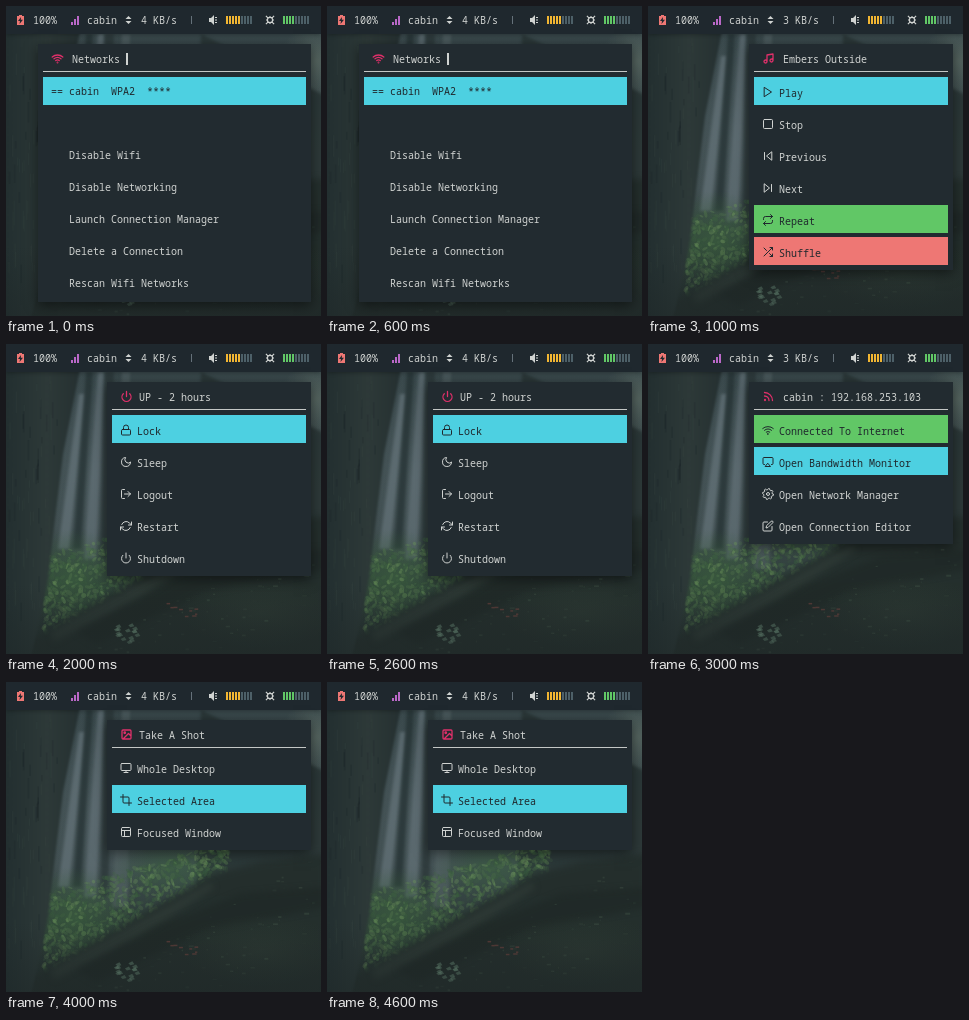
Animation of 315x310 px, one loop 5000 ms. Source, as an HTML page with a canvas:

```html
<!DOCTYPE html>
<html lang="en">
<head>
<meta charset="utf-8">
<title>Desktop menus</title>
<style>
html, body { margin: 0; width: 315px; height: 310px; overflow: hidden; background: #20292c; }
canvas { display: block; }
</style>
</head>
<body>
<canvas id="stage" width="315" height="310"></canvas>
<script>
const W = 315, H = 310;
const stage = document.getElementById('stage');
const ctx = stage.getContext('2d');
const FONT = '10px "Noto Sans Mono", "DejaVu Sans Mono", monospace';
const C = {
  bar: '#1f282e', panel: '#222b30', text: '#d0d3d1', dark: '#1f282d', pink: '#e0306a',
  cyan: '#4dd0e1', green: '#61c766', red: '#ee7774', amber: '#f2b632',
  purple: '#ba68c8', dim: '#4d6068'
};
const SSID = 'cabin';

// Line icons on a 24 unit grid
const box = 'M5 3h14a2 2 0 0 1 2 2v14a2 2 0 0 1-2 2H5a2 2 0 0 1-2-2V5a2 2 0 0 1 2-2z';
const ring = (x, y, r) => `M${x - r} ${y}a${r} ${r} 0 1 0 ${2 * r} 0a${r} ${r} 0 1 0 ${-2 * r} 0z`;

function gear() {
  let d = ring(12, 12, 3);
  for (let i = 0; i < 32; i++) {
    const a = (i + 0.5) * Math.PI / 16, r = i % 4 < 2 ? 11 : 8.5;
    d += (i ? 'L' : 'M') + (12 + r * Math.cos(a)).toFixed(2) + ' ' + (12 + r * Math.sin(a)).toFixed(2);
  }
  return d + 'z';
}

const icons = {
  music: 'M9 18V5l12-2v13' + ring(6, 18, 3) + ring(18, 16, 3),
  play: 'M5 3l14 9-14 9z',
  stop: box,
  prev: 'M19 20L9 12l10-8zM5 19V5',
  next: 'M5 4l10 8-10 8zM19 5v14',
  repeat: 'M17 1l4 4-4 4M3 11V9a4 4 0 0 1 4-4h14M7 23l-4-4 4-4M21 13v2a4 4 0 0 1-4 4H3',
  shuffle: 'M16 3h5v5M4 20L21 3M21 16v5h-5M15 15l6 6M4 4l5 5',
  power: 'M18.4 6.6a9 9 0 1 1-12.8 0M12 2v10',
  lock: 'M5 11h14a2 2 0 0 1 2 2v7a2 2 0 0 1-2 2H5a2 2 0 0 1-2-2v-7a2 2 0 0 1 2-2zM7 11V7a5 5 0 0 1 10 0v4',
  moon: 'M21 12.8A9 9 0 1 1 11.2 3 7 7 0 0 0 21 12.8z',
  logout: 'M9 21H5a2 2 0 0 1-2-2V5a2 2 0 0 1 2-2h4M16 17l5-5-5-5M21 12H9',
  restart: 'M23 4v6h-6M1 20v-6h6M3.5 9a9 9 0 0 1 14.9-3.4L23 10M1 14l4.6 4.4A9 9 0 0 0 20.5 15',
  feed: 'M4 11a9 9 0 0 1 9 9M4 4a16 16 0 0 1 16 16' + ring(5, 19, 1),
  wifi: 'M5 12.6a11 11 0 0 1 14 0M1.4 9a16 16 0 0 1 21.2 0M8.5 16.1a6 6 0 0 1 7 0' + ring(12, 20, 0.6),
  cast: 'M5 17H4a2 2 0 0 1-2-2V5a2 2 0 0 1 2-2h16a2 2 0 0 1 2 2v10a2 2 0 0 1-2 2h-1M12 15l5 6H7z',
  gear: gear(),
  edit: 'M11 4H4a2 2 0 0 0-2 2v14a2 2 0 0 0 2 2h14a2 2 0 0 0 2-2v-7M18.5 2.5a2.1 2.1 0 0 1 3 3L12 15l-4 1 1-4z',
  image: box + ring(8.5, 8.5, 1.5) + 'M21 15l-5-5L5 21',
  screen: 'M4 3h16a2 2 0 0 1 2 2v10a2 2 0 0 1-2 2H4a2 2 0 0 1-2-2V5a2 2 0 0 1 2-2zM8 21h8M12 17v4',
  crop: 'M6 1v15a2 2 0 0 0 2 2h15M1 6h15a2 2 0 0 1 2 2v15',
  layout: box + 'M3 9h18M9 21V9'
};

// Each row: icon, label, optional fill
const menus = [
  { x: 32, title: 'Networks', icon: 'wifi', tx: 66, rate: 4, cursor: true, rows: [
    [null, `== ${SSID}  WPA2  ****`, C.cyan], [null, ''],
    ...['Disable Wifi', 'Disable Networking', 'Launch Connection Manager',
      'Delete a Connection', 'Rescan Wifi Networks'].map(s => [null, '   ' + s])] },
  { x: 101, title: 'Embers Outside', icon: 'music', tx: 135, rate: 3, rows: [
    ['play', 'Play', C.cyan], ['stop', 'Stop'], ['prev', 'Previous'], ['next', 'Next'],
    ['repeat', 'Repeat', C.green], ['shuffle', 'Shuffle', C.red]] },
  { x: 101, title: 'UP - 2 hours', icon: 'power', tx: 133, rate: 4, rows: [
    ['lock', 'Lock', C.cyan], ['moon', 'Sleep'], ['logout', 'Logout'],
    ['restart', 'Restart'], ['power', 'Shutdown']] },
  { x: 101, title: SSID + ' : 192.168.253.103', icon: 'feed', tx: 135, rate: 3, rows: [
    ['wifi', 'Connected To Internet', C.green], ['cast', 'Open Bandwidth Monitor', C.cyan],
    ['gear', 'Open Network Manager'], ['edit', 'Open Connection Editor']] },
  { x: 101, title: 'Take A Shot', icon: 'image', tx: 133, rate: 4, rows: [
    ['screen', 'Whole Desktop'], ['crop', 'Selected Area', C.cyan], ['layout', 'Focused Window']] }
];

function rect(g, x, y, w, h, fill) {
  g.fillStyle = fill;
  g.fillRect(x, y, w, h);
}

function poly(g, fill, ...p) {
  g.fillStyle = fill;
  g.beginPath();
  for (let i = 0; i < p.length; i += 2) g.lineTo(p[i], p[i + 1]);
  g.fill();
}

function text(s, x, y, color = C.text) {
  ctx.font = FONT;
  ctx.fillStyle = color;
  ctx.fillText(s, x, y);
}

function icon(name, cx, cy, color, weight = 2) {
  ctx.save();
  ctx.translate(cx - 6, cy - 6);
  ctx.scale(0.5, 0.5);
  ctx.lineWidth = weight;
  ctx.lineCap = ctx.lineJoin = 'round';
  ctx.strokeStyle = color;
  ctx.stroke(new Path2D(icons[name]));
  ctx.restore();
}

// Soft elliptical patch of colour
function glow(g, x, y, rx, ry, rgb, alpha) {
  g.save();
  g.translate(x, y);
  g.scale(rx, ry);
  const f = g.createRadialGradient(0, 0, 0, 0, 0, 1);
  f.addColorStop(0, `rgba(${rgb},${alpha})`);
  f.addColorStop(1, `rgba(${rgb},0)`);
  g.fillStyle = f;
  g.fillRect(-1, -1, 2, 2);
  g.restore();
}

function makeForest() {
  const c = document.createElement('canvas');
  c.width = W; c.height = H;
  const g = c.getContext('2d');
  let seed = 11;
  const rnd = () => (seed = seed * 16807 % 2147483647) / 2147483647;

  const sky = g.createLinearGradient(0, 28, 0, H);
  sky.addColorStop(0, '#38474a');
  sky.addColorStop(0.55, '#3f4d4f');
  sky.addColorStop(0.75, '#2d3d38');
  sky.addColorStop(1, '#252f2f');
  rect(g, 0, 0, W, H, sky);
  glow(g, 90, 130, 60, 110, '88,103,108', 0.5);
  glow(g, 310, 55, 35, 40, '104,120,110', 0.6);
  glow(g, 310, 150, 40, 80, '78,92,84', 0.4);

  // Leaning pale and dark trunks in the mist
  g.filter = 'blur(1.5px)';
  poly(g, 'rgba(108,123,129,.6)', 73, 50, 79, 50, 63, 205, 52, 205);
  poly(g, 'rgba(35,47,49,.7)', 80, 28, 87, 28, 75, 205, 67, 205);
  poly(g, 'rgba(108,123,129,.55)', 92, 28, 98, 28, 90, 215, 78, 215);
  poly(g, 'rgba(40,52,54,.7)', 99, 28, 108, 28, 102, 215, 94, 215);
  poly(g, 'rgba(98,113,115,.4)', 116, 28, 124, 28, 122, 225, 106, 225);
  poly(g, 'rgba(36,48,48,.7)', 195, 28, 320, 90, 320, 215, 190, 215);
  g.filter = 'none';

  // Undergrowth follows the edge of the bank
  glow(g, 68, 235, 55, 50, '58,92,62', 0.8);
  glow(g, 165, 186, 60, 30, '58,92,66', 0.75);
  const edge = x => 290 - 0.57 * (x - 35);
  g.filter = 'blur(.7px)';
  for (let i = 0; i < 800; i++) {
    const x = 38 + rnd() ** 1.3 * 185;
    const y = edge(x) + 4 - rnd() * (90 - x * 0.28);
    const lit = rnd() ** 2;
    g.fillStyle = `rgba(${58 + lit * 62 | 0},${92 + lit * 68 | 0},${62 + lit * 36 | 0},${0.15 + rnd() * 0.35})`;
    g.beginPath();
    g.ellipse(x, y, 1 + rnd() * 3, 0.8 + rnd() * 1.6, rnd() * 3, 0, 7);
    g.fill();
  }

  // Bank and fallen log
  g.filter = 'blur(3px)';
  poly(g, 'rgba(37,47,45,.97)', 25, edge(25), 205, edge(205), 255, 180, 320, 172, 320, 320, 25, 320);
  poly(g, 'rgba(49,61,56,.7)', 45, 288, 130, 242, 205, 200, 208, 206, 132, 255, 48, 298);
  poly(g, 'rgba(30,39,38,.6)', 70, 288, 150, 245, 235, 212, 320, 205, 320, 225, 200, 248, 90, 300);
  g.filter = 'none';
  glow(g, 255, 268, 80, 36, '48,62,54', 0.5);

  // Small plants on the ground
  g.filter = 'blur(.6px)';
  for (let i = 0; i < 90; i++) {
    const x = 90 + rnd() * 220, y = edge(x) + 40 + rnd() * 80;
    rect(g, x, y, 1 + rnd() * 4, 1 + rnd(), `rgba(88,112,92,${rnd() * 0.3})`);
  }
  for (let i = 0; i < 16; i++) {
    const x = 106 + rnd() * 24, y = 280 + rnd() * 20;
    poly(g, 'rgba(112,148,126,.5)', x, y, x + 4, y - 2, x + 6, y + 1, x + 2, y + 2);
  }
  for (let i = 0; i < 9; i++)
    rect(g, 160 + rnd() * 30, 256 + rnd() * 16, 2 + rnd() * 3, 1.5, 'rgba(140,74,70,.5)');

  // Near trunk
  const bark = g.createLinearGradient(0, 0, 74, 0);
  bark.addColorStop(0, '#232f30');
  bark.addColorStop(0.55, '#2d3938');
  bark.addColorStop(1, '#253031');
  g.filter = 'blur(1.2px)';
  poly(g, bark, -4, 20, 75, 20, 66, 65, 57, 110, 49, 175, 42, 235, 34, 275, 24, 316, -4, 316);
  g.filter = 'none';
  for (let i = 0; i < 60; i++) {
    const y = 30 + rnd() * 230, x = rnd() * (62 - y * 0.11);
    rect(g, x, y, 1.5, 6 + rnd() * 20, `rgba(${rnd() < 0.5 ? '14,22,24' : '66,80,78'},.12)`);
  }
  const shade = g.createLinearGradient(0, 240, 0, H);
  shade.addColorStop(0, 'rgba(30,39,39,0)');
  shade.addColorStop(1, 'rgba(30,39,39,.5)');
  rect(g, 0, 240, W, 70, shade);
  return c;
}

function meter(x, on, color) {
  for (let i = 0; i < 9; i++) rect(ctx, x + i * 3, 10, 2, 8, i < on ? color : C.dim);
}

function drawBar(rate) {
  ctx.save();
  ctx.shadowColor = 'rgba(0,0,0,.4)';
  ctx.shadowBlur = 5;
  rect(ctx, 0, 0, W, 28, C.bar);
  ctx.restore();

  rect(ctx, 13, 9, 3, 1, C.red);
  rect(ctx, 11, 10, 7, 9, C.red);
  poly(ctx, C.bar, 15, 11, 12, 15, 14, 15, 13.5, 18, 17, 13.8, 14.8, 13.8);
  text('100%', 27, 18);

  for (let i = 0; i < 3; i++) rect(ctx, 65 + i * 3, 16 - i * 3, 2, 3 + i * 3, C.purple);
  text(SSID, 81, 18);

  poly(ctx, C.text, 119.5, 13, 122.5, 10, 125.5, 13);
  poly(ctx, C.text, 119.5, 15, 122.5, 18, 125.5, 15);
  text(rate + ' KB/s', 135, 18);
  rect(ctx, 185, 10, 1, 8, '#65717a');

  poly(ctx, C.text, 203, 12, 205, 12, 208, 9, 208, 19, 205, 16, 203, 16);
  for (let i = 0; i < 3; i++) rect(ctx, 209, 11 + i * 2.5, 2, 1, C.text);
  meter(220, 5, C.amber);

  ctx.strokeStyle = C.text;
  ctx.lineWidth = 1.2;
  ctx.beginPath();
  ctx.arc(264, 14, 2.6, 0, 7);
  for (let i = 0; i < 8; i++) {
    const a = i * Math.PI / 4, x = Math.cos(a), y = Math.sin(a), r = i % 2 ? 5.8 : 4;
    ctx.moveTo(264 + x * 2.6, 14 + y * 2.6);
    ctx.lineTo(264 + x * r, 14 + y * r);
  }
  ctx.stroke();
  meter(277, 4, C.green);
}

function drawMenu(m) {
  const { x, rows } = m;
  ctx.save();
  ctx.shadowColor = 'rgba(0,0,0,.5)';
  ctx.shadowBlur = 12;
  ctx.shadowOffsetY = 3;
  rect(ctx, x, 38, 305 - x, 34 + rows.length * 32, C.panel);
  ctx.restore();

  icon(m.icon, x + 19.5, 52.5, C.pink, 2.6);
  text(m.title, m.tx, 57);
  if (m.cursor) rect(ctx, 120, 47, 2, 12, C.text);
  rect(ctx, x + 5, 65, 295 - x, 1, '#c4c7c5');

  rows.forEach(([name, label, fill], i) => {
    const y = 71 + i * 32, ink = fill ? C.dark : C.text;
    if (fill) rect(ctx, x + 5, y, 295 - x, 28, fill);
    if (name) icon(name, x + 19, y + 15, ink);
    text(label, name ? 131 : 45, y + (name ? 20 : 18), ink);
  });
}

const forest = makeForest();
const start = performance.now();

function frame() {
  const t = (performance.now() - start) % 5000;
  const menu = menus[Math.floor(t / 1000)];
  ctx.drawImage(forest, 0, 0);
  drawBar(menu.rate);
  drawMenu(menu);
  requestAnimationFrame(frame);
}
frame();
</script>
</body>
</html>
```
